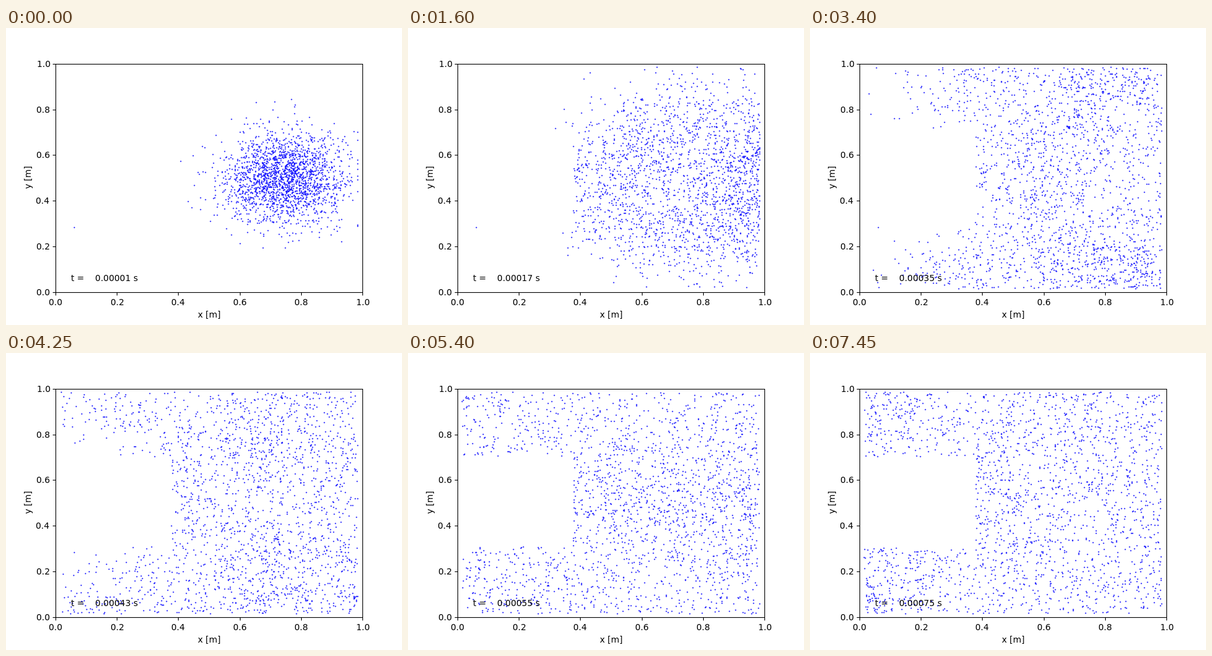
These frames come from a looping animation (640 by 480 pixels, 7500 ms). An HTML page with a canvas:

```html
<!DOCTYPE html>
<html lang="en">
<head>
<meta charset="utf-8">
<title>Particles in a box</title>
<style>
  html, body { margin: 0; width: 640px; height: 480px; overflow: hidden; background: #fff; }
  canvas { display: block; }
</style>
</head>
<body>
<canvas id="stage" width="640" height="480"></canvas>
<script>
const ctx = document.getElementById('stage').getContext('2d');
const FRAMES = 150, FRAME_MS = 50, COUNT = 2000;
const SPEED = 0.0097;                             // metres per frame
const CLOUD = { x: 0.742, y: 0.5, spread: 0.1 };
const LOW = 0.015, HIGH = 0.985;                  // reach of the particle centres
const BLOCK = { right: 0.377, bottom: 0.308, top: 0.702 };

const px = x => 80 + 496 * x;
const py = y => 427.2 - 369.6 * y;
const snap = v => Math.round(v) + 0.5;

let seed = 20417;
function random() {
  seed = (seed * 1664525 + 1013904223) % 4294967296;
  return (seed + 0.5) / 4294967296;
}
const gauss = () => Math.sqrt(-2 * Math.log(random())) * Math.cos(2 * Math.PI * random());

// Equal speeds in isotropic directions in space, seen in the x-y plane
function makeParticle() {
  const u = 2 * random() - 1, angle = 2 * Math.PI * random();
  const speed = SPEED * Math.sqrt(1 - u * u);
  return {
    x: Math.min(HIGH, CLOUD.x + CLOUD.spread * gauss()),
    y: CLOUD.y + CLOUD.spread * gauss(),
    vx: speed * Math.cos(angle),
    vy: speed * Math.sin(angle)
  };
}

function bounce(p, axis, wall) {
  p[axis] = 2 * wall - p[axis];
  p['v' + axis] *= -1;
}

function step(p) {
  const oldX = p.x;
  p.x += p.vx;
  p.y += p.vy;
  for (const axis of ['x', 'y']) {
    if (p[axis] < LOW) bounce(p, axis, LOW);
    if (p[axis] > HIGH) bounce(p, axis, HIGH);
  }
  if (p.x < BLOCK.right && p.y > BLOCK.bottom && p.y < BLOCK.top) {
    if (oldX >= BLOCK.right) bounce(p, 'x', BLOCK.right);
    else bounce(p, 'y', p.vy > 0 ? BLOCK.bottom : BLOCK.top);
  }
}

const particles = Array.from({ length: COUNT }, makeParticle);
particles.push({ x: 0.061, y: 0.282, vx: 0, vy: 0 });   // one lies at rest

const history = [];
for (let f = 0; f < FRAMES; f++) {
  history.push(particles.map(p => [p.x, p.y]));
  particles.forEach(step);
}

function line(x1, y1, x2, y2) {
  ctx.beginPath();
  ctx.moveTo(x1, y1);
  ctx.lineTo(x2, y2);
  ctx.stroke();
}

// Aligns by the inked width, on whole pixels; align is 0 (left) to 1 (right)
function text(str, x, y, align) {
  const box = ctx.measureText(str);
  const width = box.actualBoundingBoxLeft + box.actualBoundingBoxRight;
  ctx.fillText(str, Math.round(x - align * width), y);
}

function drawAxes() {
  const left = snap(px(0)), right = snap(px(1)), top = snap(py(1)), bottom = snap(py(0));
  ctx.strokeStyle = ctx.fillStyle = '#000';
  ctx.lineWidth = 1.11;
  ctx.strokeRect(left, top, right - left, bottom - top);
  for (let i = 0; i <= 5; i++) {
    const value = i / 5, label = value.toFixed(1);
    const x = snap(px(value)), y = snap(py(value));
    line(x, bottom, x, bottom + 4.9);
    line(left, y, left - 4.9, y);
    text(label, px(value), 448, 0.5);
    text(label, 70.3, Math.round(py(value)) + 5, 1);
  }
  text('x [m]', 328, 468, 0.5);
  ctx.save();
  ctx.translate(40, 242);
  ctx.rotate(-Math.PI / 2);
  text('y [m]', 0, 0, 0.5);
  ctx.restore();
}

function draw(frame) {
  ctx.fillStyle = '#fff';
  ctx.fillRect(0, 0, 640, 480);
  ctx.fillStyle = '#00f';
  ctx.beginPath();
  for (const [x, y] of history[frame]) {
    const cx = Math.floor(px(x)) + 0.5, cy = Math.floor(py(y)) + 0.5;
    ctx.moveTo(cx + 1.04, cy);
    ctx.arc(cx, cy, 1.04, 0, 2 * Math.PI);
  }
  ctx.fill();
  ctx.font = '13.89px "DejaVu Sans", sans-serif';
  drawAxes();
  // Each frame is 5 microseconds, shown rounded to 10
  const hundredths = Math.round((frame + 1) / 2);
  text('t =    0.000' + String(hundredths).padStart(2, '0') + ' s', 104.8, 409, 0);
}

function tick() {
  draw(Math.floor(performance.now() / FRAME_MS) % FRAMES);
  requestAnimationFrame(tick);
}
tick();
</script>
</body>
</html>
```
